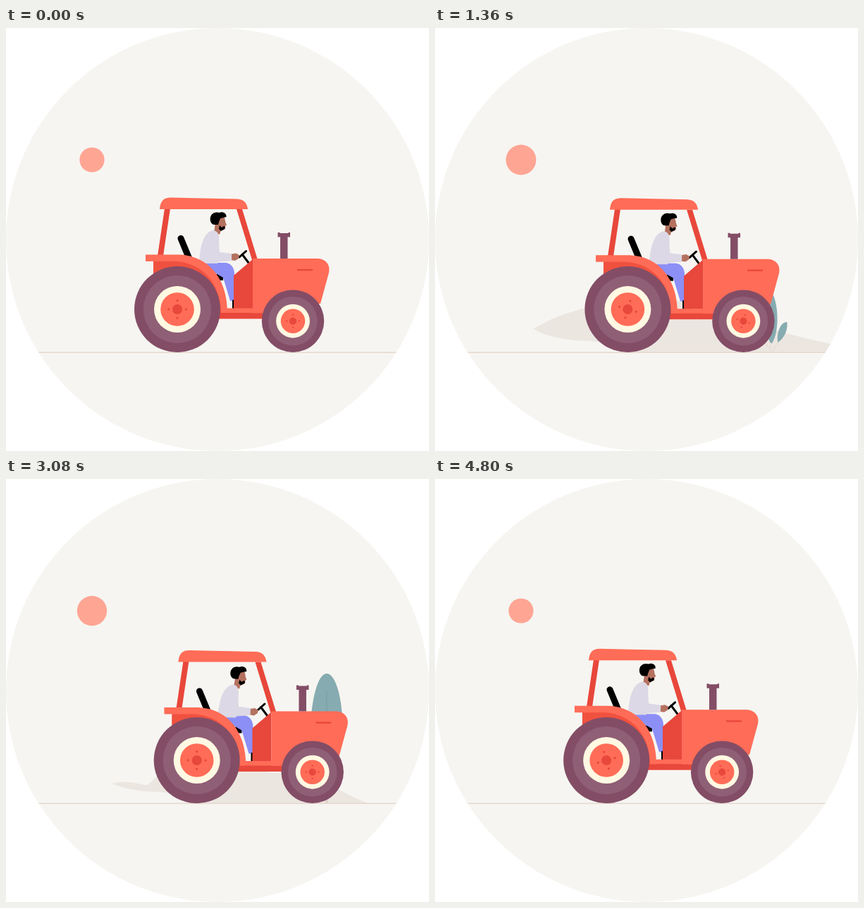
Recreate the animation shown at these times as an HTML page. Size 600x600 px, loop 4840 ms.

```html
<!DOCTYPE html>
<html lang="en">
<head>
<meta charset="utf-8">
<title>Tractor</title>
<style>
  html, body { margin: 0; height: 100%; overflow: hidden; background: #fff; }
  svg { display: block; width: 100%; height: 100%; }
  .paper { fill: #f6f5f1; }
  .hill { fill: #ece6e0; }
  .leaf { fill: #86abb0; }
  .coral { fill: #ff6c57; }
  .red { fill: #e8473b; }
  .plum { fill: #834d66; }
  .skin { fill: #b5715f; }
  .stroke { fill: none; stroke: #000; stroke-linecap: round; }
</style>
</head>
<body>
<svg viewBox="0 0 600 600">
  <defs>
    <clipPath id="disc"><circle cx="300" cy="300" r="300"/></clipPath>
    <g id="wheel">
      <circle class="plum" r="61"/>
      <circle r="48" fill="#8f5f76"/>
      <circle r="33" fill="#fff8e2"/>
      <circle class="coral" r="23.8"/>
      <g class="red spin">
        <circle r="7"/>
        <circle cy="-12.3" r="1.6"/><circle cy="12.3" r="1.6"/>
        <circle cx="-12.3" r="1.6"/><circle cx="12.3" r="1.6"/>
      </g>
    </g>
  </defs>

  <g clip-path="url(#disc)">
    <rect class="paper" width="600" height="600"/>
    <circle id="sun" cx="122" cy="187" fill="#ffa594"/>

    <!-- hills sink behind a fixed slope on the left -->
    <path id="wideHill" class="hill" d="M327 460C365 436 385 416 430 403C465 391 505 384.500 545 384.500C605 385 635 401 685 418C745 438 800 448 850 460Z"/>
    <path id="twinHill" class="hill" d="M343 460C352 440 365 430 382 430C399 429 410 434 420 434C445 410 470 387 518 387.500C548 389 568 405 580 413C600 420 615 414 637 419C680 429 705 452 734 460Z"/>
    <path class="paper" d="M0 460V387L36 388C60 391 80 390 96 397C118 406 128 423 152 433C178 443 200 443 218 444C248 446 268 455 288 460Z"/>
    <path d="M0 460.300H600" stroke="#e7d8cf" stroke-width="1.500"/>

    <g id="plant">
      <path d="M230 443L241 459M240 443V459M252 443L242 459" fill="none" stroke="#e9ded6" stroke-width="1.500"/>
      <path class="leaf" d="M231 446C222 440 217 425 219 417C228 417 234 431 233 445Z"/>
      <path class="leaf" d="M240 447C229 430 231 387 241 374C251 388 253 430 242 447Z"/>
      <path class="leaf" d="M250 446C248 432 254 417 263 417C265 426 260 440 250 446Z"/>
    </g>

    <g id="tree">
      <path d="M237 390V460" stroke="#e0cfc5" stroke-width="3"/>
      <path class="leaf" d="M237 412C218 400 211 368 215 336C218 303 226 276 237 276C248 276 257 303 259 336C263 368 256 400 237 412Z"/>
      <path d="M237 300V412" stroke="#769da3"/>
    </g>

    <g id="tractor">
      <g id="body">
        <path class="stroke" stroke-width="9" d="M248 298.500L259 325"/>
        <path d="M298 349H308V358H298Z"/>
        <path fill="#8c8ff6" d="M282 333H312C320 334 324 341 324 349V387H318L308 354L284 340Z"/>
        <path d="M321 398V386C329 384 333 389 333 398Z"/>

        <path class="red" d="M225 256H233L223 323H215ZM327 257H335L357 329H349Z"/>
        <path class="coral" d="M218 257C219 245 224 240 235 240.500L328 242.500C338 243 342 249 343 257Z"/>

        <path class="stroke" stroke-width="3" d="M331 325L340.500 316.500M335 321L344 333"/>
        <g id="driver">
          <path class="skin" d="M298 269H310L311.500 276L313 279.500L311 281V285Q308 287 305 287L303 293L295 290Z"/>
          <path d="M290 274C288 265 295 260 302 262C307 260 313 262 312.500 268L304 270L302 275L301 279L296 279C293 279 291 277 290 274Z"/>
          <path d="M303 280L306 283L309 281L311 282L310 285L305 288L302 285Z"/>
          <path class="skin" d="M318 321L326 319.500L331 322L330 327L325 330L318 329Z"/>
          <path fill="#dcd8e5" d="M294 287C302 288 303 296 302 304L303 318L320 320V330L300 332V334H274C275 312 279 290 294 287Z"/>
        </g>

        <path class="red" d="M350 328V398H323V351Z"/>
        <path class="coral" d="M300 397.500H360V405H300Z"/>
        <path class="red" d="M230 404H390V412.500H230Z"/>
        <path class="coral" d="M198 321.500H246C288 323 314 356 314 404H209V331H198Z"/>
        <path fill="#f0513f" d="M209 331H240C279 333 304 362 305 404H209Z"/>
        <path class="coral" d="M350 327H443C455 328 460 337 458 347L446 391H420L365 404.500H350Z"/>
        <path class="red" d="M413 342H435V344.300H413Z"/>
        <path class="plum" d="M385.500 290H388L389 291H400L401 290H403V296.500H399.500V327H389V296.500H385.500Z"/>
      </g>
      <g id="wheels">
        <use href="#wheel" x="243" y="399"/>
        <use href="#wheel" transform="translate(407 415.700) scale(.725)"/>
      </g>
    </g>
  </g>
</svg>
<script>
  const LOOP = 4840, SCROLL = 0.455;
  const get = id => document.getElementById(id);
  const move = (id, x, y = 0) => get(id).setAttribute('transform', `translate(${x} ${y})`);
  const wave = (t, period) => (1 - Math.cos(2 * Math.PI * t / period)) / 2;
  const spinner = document.querySelector('.spin');

  // each piece of scenery is drawn where it stands at the given moment
  const scenery = { wideHill: 840, plant: 1880, twinHill: 2600, tree: 3560 };

  function draw(t) {
    const bounce = wave(t, 1170);
    const grow = t < 2080 ? t / 2080 : Math.max(0, 1 - (t - 2080) / 2560);
    get('sun').setAttribute('r', 17.6 + 5.9 * grow);

    for (const [id, at] of Object.entries(scenery)) move(id, SCROLL * (at - t));

    move('tractor', t < 4320 ? 43 * wave(t, 4320) : 0);
    move('body', 0, 3 * bounce);
    move('wheels', 1.5 * bounce);
    get('driver').setAttribute('transform',
      `translate(0 ${1.8 * bounce}) rotate(${2.4 * bounce} 284 334)`);
    spinner.setAttribute('transform', `rotate(${1980 * t / LOOP})`);
  }

  const start = performance.now();
  (function tick() {
    draw((performance.now() - start) % LOOP);
    requestAnimationFrame(tick);
  })();
</script>
</body>
</html>
```
